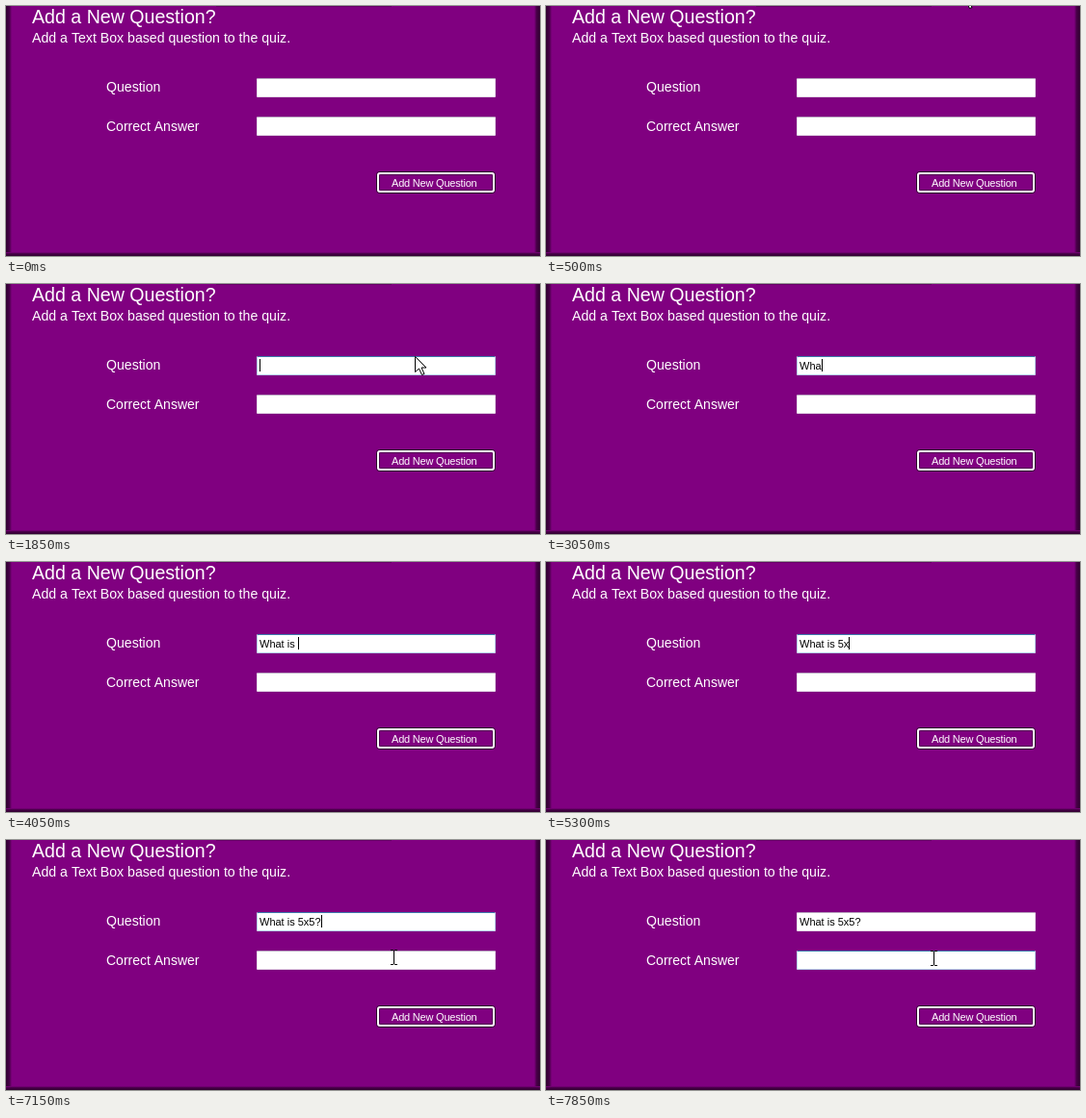
An HTML page with a canvas that plays this animation: 554 by 260 pixels, repeating every 8000 ms.

```html
<!DOCTYPE html>
<html lang="en">
<head>
<meta charset="utf-8">
<title>Add a New Question</title>
<style>
  html, body { margin: 0; width: 100%; height: 100%; overflow: hidden; background: #800080; }
  canvas { display: block; }
</style>
</head>
<body>
<canvas id="stage" width="554" height="260"></canvas>
<script>
const ctx = document.getElementById('stage').getContext('2d');
const LOOP = 8000, STEP = 50, BLINK = 530;
const QUESTION = 'What is 5x5?';
const KEY_TIMES = [2750, 2900, 3050, 3200, 3400, 3600, 3700, 3850, 4950, 5250, 5450, 5650];
const FOCUS_QUESTION = 1770, FOCUS_ANSWER = 7320;
const CARET_RESETS = [FOCUS_QUESTION, ...KEY_TIMES, FOCUS_ANSWER];

// Pointer waypoints: time, x, y
const ENTER = [[450, 432, -20], [900, 425, 61], [1100, 425, 71], [1400, 425, 71], [2050, 424, 76]];
const LEAVE = [[6250, 424, 76], [6350, 424, 76], [7050, 402, 121], [7200, 402, 121], [7500, 402, 122]];

function pointerAt(path, t) {
  const next = path.findIndex(p => p[0] > t);
  if (next < 0) return path[path.length - 1].slice(1);
  const [t0, x0, y0] = path[next - 1], [t1, x1, y1] = path[next];
  const u = (t - t0) / (t1 - t0), k = u * u * (3 - 2 * u);
  return [Math.round(x0 + (x1 - x0) * k), Math.round(y0 + (y1 - y0) * k)];
}

function rect(color, x, y, w, h) {
  ctx.fillStyle = color;
  ctx.fillRect(x, y, w, h);
}

function frame(color, width, x, y, w, h, radius) {
  ctx.strokeStyle = color;
  ctx.lineWidth = width;
  ctx.beginPath();
  ctx.roundRect(x, y, w, h, radius);
  ctx.stroke();
}

function text(str, x, y, size, color = '#fff', spacing = 0) {
  ctx.font = `${size}px "Liberation Sans", Arial, sans-serif`;
  ctx.letterSpacing = spacing + 'px';
  ctx.fillStyle = color;
  ctx.fillText(str, x, y);
}

function edge(x0, y0, x1, y1) {
  const g = ctx.createLinearGradient(x0, y0, x1, y1);
  g.addColorStop(0, '#300030');
  g.addColorStop(0.6, '#480048');
  g.addColorStop(1, '#800080');
  ctx.fillStyle = g;
  ctx.fillRect(Math.min(x0, x1), Math.min(y0, y1), Math.abs(x1 - x0) || 554, Math.abs(y1 - y0) || 260);
}

function field(y, value, focused, caretOn) {
  ctx.fillStyle = '#fff';
  ctx.beginPath();
  ctx.roundRect(260, y, 248, 20, 1.5);
  ctx.fill();
  frame(focused ? '#b5cfe7' : '#e3d6e6', 1, 260.5, y + 0.5, 247, 19, 1.5);
  rect(focused ? '#3d7bad' : '#b9a6c0', 261, y, 246, 1);
  text(value, 263, y + 14, 11, '#000');
  if (caretOn) rect('#000', Math.round(263 + ctx.measureText(value).width), y + 3, 1, 13);
}

function button() {
  frame('#280028', 1, 384.5, 172.5, 123, 22, 3);
  frame('#fff', 2, 386, 174, 120, 19, 2);
  frame('#500050', 1, 387.5, 175.5, 117, 16, 1);
  text('Add New Question', 400, 188, 11, '#fff', -0.2);
}

function page() {
  rect('#800080', 0, 0, 554, 260);
  edge(0, 0, 6, 0);
  edge(554, 0, 548, 0);
  edge(0, 260, 0, 256);
  rect('#55005599', 218, 0, 182, 1);
  text('Add a New Question?', 27, 18, 19.6);
  text('Add a Text Box based question to the quiz.', 27, 38, 14.15);
  text('Question', 104, 89, 14.1);
  text('Correct Answer', 104, 130, 14);
  button();
}

function arrow(x, y) {
  const outline = [[0, 0], [0, 16], [4, 12.5], [7, 19], [9.5, 18], [6.5, 11.5], [11.5, 11.5]];
  ctx.beginPath();
  outline.forEach(([dx, dy]) => ctx.lineTo(x + dx + 0.5, y + dy + 0.5));
  ctx.closePath();
  ctx.fillStyle = '#fff';
  ctx.fill();
  ctx.strokeStyle = '#000';
  ctx.lineWidth = 1;
  ctx.stroke();
}

function iBeam(x, y) {
  rect('#000', x, y - 6, 1, 14);
  for (const top of [y - 7, y + 8]) {
    rect('#000', x - 3, top, 3, 1);
    rect('#000', x + 1, top, 3, 1);
  }
}

function pointer(t) {
  const path = t >= 6250 ? LEAVE : t >= 450 && t < 2750 ? ENTER : null;
  if (!path) return;
  const [x, y] = pointerAt(path, t);
  const overField = (y > 77 && y < 95) || (y > 116 && y < 134);
  (overField ? iBeam : arrow)(x, y);
}

function draw(now) {
  const t = Math.floor((now % LOOP) / STEP) * STEP;
  const typed = QUESTION.slice(0, KEY_TIMES.filter(k => k <= t).length);
  const reset = CARET_RESETS.filter(r => r <= t).pop();
  const caretOn = reset !== undefined && Math.floor((t - reset) / BLINK) % 2 === 0;
  const onAnswer = t >= FOCUS_ANSWER;
  const onQuestion = t >= FOCUS_QUESTION && !onAnswer;

  page();
  field(75, typed, onQuestion, onQuestion && caretOn);
  field(115, '', onAnswer, onAnswer && caretOn);
  pointer(t);
}

const start = performance.now();
function tick() {
  draw(performance.now() - start);
  requestAnimationFrame(tick);
}
tick();
</script>
</body>
</html>
```
